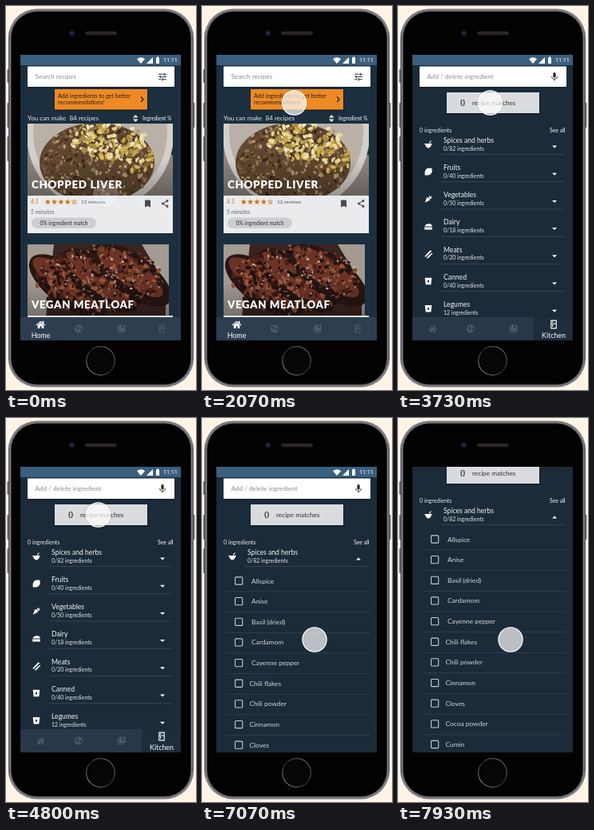
Write an HTML page that moves like this. It is 238 px wide and 480 px high and loops after 8 s.

```html
<!DOCTYPE html>
<html lang="en">
<head>
<meta charset="utf-8">
<title>Recipe app walkthrough</title>
<style>
  html, body { margin: 0; width: 100%; height: 100%; overflow: hidden; background: #fdf4e6; }
  svg { display: block; width: 100vw; height: 100vh; }
  text { font-family: Lato, "Open Sans", sans-serif; white-space: pre; }
</style>
</head>
<body>
<svg id="stage" viewBox="0 0 238 480">
  <defs>
    <clipPath id="screenClip"><rect x="18" y="61" width="201" height="357"/></clipPath>
    <clipPath id="photoA"><rect x="27" y="147" width="182" height="90"/></clipPath>
    <clipPath id="photoB"><rect x="27" y="298" width="177" height="90"/></clipPath>
    <linearGradient id="shade" x1="0" y1="0" x2="0" y2="1">
      <stop offset=".5" stop-color="#000" stop-opacity="0"/>
      <stop offset="1" stop-color="#000" stop-opacity=".28"/>
    </linearGradient>
    <linearGradient id="rim" x1="0" y1="0" x2="1" y2="0">
      <stop offset="0" stop-color="#4f4d54"/><stop offset=".01" stop-color="#7d7a82"/>
      <stop offset=".99" stop-color="#7d7a82"/><stop offset="1" stop-color="#4f4d54"/>
    </linearGradient>
    <linearGradient id="ring" x1="0" y1="1" x2="1" y2="0">
      <stop offset="0" stop-color="#8b898c"/><stop offset=".5" stop-color="#2b2a2c"/>
      <stop offset="1" stop-color="#6d6b6e"/>
    </linearGradient>
  </defs>
</svg>
<script>
const LOOP = 8000;
const ICON = {
  home: 'M12 4L1 13l1.300 1.600L12 6.700l9.700 7.900L23 13l-4-3.300V4h-3v3.300zM12 8.500L5 14v7h5v-5h4v5h5v-7z',
  globe: 'M12 2a10 10 0 1 0 0 20a10 10 0 0 0 0-20zM5 9l5-4 3 2-3 4 2 3-2 5-2-5zM15 10l4-1 1 4-3 5-3-4z',
  book: 'M2 6h2v14h14v2H2zM6 2h16v16H6zM13 4v8l2.500-2 2.500 2V4z',
  fridge: 'M5 2h14v20H5zM7 4v5h10V4zM7 11v9h10v-9zM8.500 5h2v3h-2zM8.500 12h2v5h-2z',
  tune: 'M3 17v2h6v-2zM3 5v2h10V5zM13 21v-2h8v-2h-8v-2h-2v6zM7 9v2H3v2h4v2h2V9zM21 13v-2H11v2zM15 9h2V7h4V5h-4V3h-2z',
  mic: 'M12 14a3 3 0 0 0 3-3V5a3 3 0 0 0-6 0v6a3 3 0 0 0 3 3zM17.300 11a5.300 5.300 0 0 1-10.600 0H5a7 7 0 0 0 6 6.700V21h2v-3.300a7 7 0 0 0 6-6.700z',
  bookmark: 'M7 3h10a2 2 0 0 1 2 2v16l-7-3-7 3V5a2 2 0 0 1 2-2z',
  share: 'M18 2a3 3 0 0 0-3 3.700L8.500 9.500a3 3 0 1 0 0 5L15 18.300a3 3 0 1 0 1-1.700L9 12.700v-1.400L16 7.400A3 3 0 1 0 18 2z',
  star: 'M12 17.300l6.200 3.700-1.600-7L22 9.200l-7.200-.6L12 2 9.200 8.600 2 9.200 7.500 14l-1.700 7z',
  mortar: 'M2 10h20v2h-2c0 4-2 6-4 7v2H8v-2c-2-1-4-3-4-7H2zM13 9l5-7 2 1-4 6z',
  lemon: 'M21 3c-6-2-13-1-16 4-3 4-2 9-2 14 5 0 10 1 14-2 5-4 6-10 4-16z',
  carrot: 'M3 21l5-13c4-2 9 2 8 7zM14 8l1-6 2 4 4-3-2 5 4 1-6 2z',
  cheese: 'M2 12C4 6 10 4 16 5c4 1 6 4 6 7zM2 14h20v6H2z',
  bacon: 'M2 17c6 0 4-5 8-7s3-6 9-7l2 3c-6 1-4 5-8 7s-3 6-9 7zM7 22c5-1 4-5 8-7s3-4 7-5l1 3c-5 1-4 4-7 6s-4 4-7 5z',
  can: 'M3 3h18l-2 18H5zM12 8c-3 3-3 7 0 8 3-1 3-5 0-8z'
};

function add(parent, tag, attrs, content) {
  const el = document.createElementNS('http://www.w3.org/2000/svg', tag);
  for (const key in attrs) el.setAttribute(key, attrs[key]);
  if (content) el.textContent = content;
  parent.appendChild(el);
  return el;
}
const group = (p, attrs = {}) => add(p, 'g', attrs);
const rect = (p, x, y, width, height, fill, extra) => add(p, 'rect', { x, y, width, height, fill, ...extra });
const circle = (p, cx, cy, r, fill, extra) => add(p, 'circle', { cx, cy, r, fill, ...extra });
const path = (p, d, fill, extra) => add(p, 'path', { d, fill, ...extra });
const oval = (p, cx, cy, rx, ry, fill, turn = 0) =>
  add(p, 'ellipse', { cx, cy, rx, ry, fill, transform: `rotate(${turn} ${cx} ${cy})` });
const label = (p, str, x, y, size, fill, extra) =>
  add(p, 'text', { x, y, 'font-size': size, fill, ...extra }, str);
const icon = (p, name, cx, cy, size, fill) => path(p, ICON[name], fill, {
  'fill-rule': 'evenodd',
  transform: `translate(${cx - size / 2} ${cy - size / 2}) scale(${size / 24})`
});

function seeded(seed) {
  return () => (seed = (seed * 16807) % 2147483647) / 2147483647;
}

// Scatter small rounded crumbs inside an ellipse.
function crumbs(p, n, cx, cy, rx, ry, size, colours, seed) {
  const rnd = seeded(seed);
  for (let i = 0; i < n; i++) {
    const a = rnd() * Math.PI * 2, d = Math.sqrt(rnd());
    const w = size * (.5 + rnd());
    oval(p, cx + Math.cos(a) * d * rx, cy + Math.sin(a) * d * ry, w, w * .6,
      colours[Math.floor(rnd() * colours.length)], rnd() * 180);
  }
}

function statusBar(p) {
  rect(p, 18, 61, 201, 13, '#3b5f7e');
  path(p, 'M164 66.200q5-4 10 0l-5 5.800z', '#fff');
  path(p, 'M176 72h8v-8z', '#fff');
  path(p, 'M188 64.500h1v-1h2v1h1V72h-4z', '#fff');
  label(p, '11:11', 197, 70.300, 7.200, '#fff', { style: 'font-family:Roboto,sans-serif' });
}

function searchBox(p, hint, name) {
  rect(p, 27, 76, 184, 26.500, '#000', { opacity: .25 });
  rect(p, 27, 75.500, 184, 25.500, '#fff', { rx: 1 });
  label(p, hint, 36.500, 91, 8.200, '#8a8d91');
  icon(p, name, 196, 88.500, 13, '#26282b');
}

function navBar(p, active, bg, dim) {
  rect(p, 18, 389, 201, 29, bg);
  ['home', 'globe', 'book', 'fridge'].forEach((name, i) => {
    const on = i === active, x = [43.500, 91, 144.500, 195][i];
    if (on && i) rect(p, 170, 389, 49, 29, '#1d2d3b');
    icon(p, name, x, on ? 398 : 403.500, on ? 13 : 12, on ? '#fff' : dim);
    if (on) label(p, i ? 'Kitchen' : 'Home', x, 414.800, 8.900, '#fff', { 'text-anchor': 'middle' });
  });
}

function liverPhoto(p) {
  const g = group(p, { 'clip-path': 'url(#photoA)' });
  rect(g, 27, 147, 182, 90, '#8d857e');
  path(g, 'M150 147h59v40z', '#3d2b20');
  oval(g, 118, 160, 92, 95, '#d3cfca');
  oval(g, 118, 158, 84, 88, '#b9b1a8');
  oval(g, 114, 196, 72, 50, '#5e4630');
  crumbs(g, 480, 114, 196, 71, 49, 2.200, ['#7b5d3f', '#48331f', '#94764f', '#b59a70', '#35251a', '#6b4d32'], 71);
  crumbs(g, 150, 127, 168, 48, 25, 3.200, ['#d9bd5c', '#e6d596', '#c6a548', '#efe3b8', '#a98a45'], 29);
  crumbs(g, 60, 160, 190, 28, 18, 2.800, ['#d9bd5c', '#e6d596', '#c6a548', '#8a6a3c'], 43);
  rect(g, 27, 147, 182, 90, 'url(#shade)');
}

function loafPhoto(p) {
  const g = group(p, { 'clip-path': 'url(#photoB)' });
  rect(g, 27, 298, 177, 90, '#a39b92');
  path(g, 'M60 298h110l30 50v40H50z', '#3a2420');
  for (let i = 0; i < 3; i++) {
    const x = 78 + i * 40, y = 350 - i * 7;
    oval(g, x, y, 58, 25, '#271614', 36);
    oval(g, x - 3, y - 4, 50, 16, '#6a3325', 36);
  }
  crumbs(g, 420, 117, 344, 80, 46, 2.700, ['#24130f', '#7c3a28', '#4a2019', '#94553a', '#351a16', '#1c1112'], 53);
  crumbs(g, 110, 122, 338, 76, 36, 1.400, ['#b98a73', '#c9b3a8', '#a0603f', '#8d7a74'], 97);
  rect(g, 27, 298, 177, 90, 'url(#shade)');
}

function homeScreen(p) {
  const g = group(p), title = { 'font-weight': 900, 'letter-spacing': '.05em' };
  rect(g, 18, 61, 201, 357, '#1b2f3f');
  statusBar(g);
  searchBox(g, 'Search recipes', 'tune');
  rect(g, 61, 105, 117, 26, '#000', { opacity: .35 });
  rect(g, 61, 104, 116, 25.500, '#ee8a25');
  label(g, 'Add ingredients to get better', 65, 114.800, 7.200, '#2b2116');
  label(g, 'recommendations!', 65, 123, 7.200, '#2b2116');
  path(g, 'M169 113.500l3 3.300-3 3.300', 'none', { stroke: '#2b2116', 'stroke-width': 1.300 });
  label(g, 'You can make  84 recipes', 27, 143, 8.050, '#e6eaee');
  path(g, 'M159 139.500l3.200-3.500 3.200 3.500zM159 141.500l3.200 3.500 3.200-3.500z', '#fff');
  label(g, 'Ingredient %', 171, 142.800, 6.600, '#fff');

  liverPhoto(g);
  label(g, 'CHOPPED LIVER', 32, 227.800, 13.400, '#fff', title);
  rect(g, 27, 237, 182, 47, '#e9ebec');
  label(g, '4.1', 31, 247.300, 7, '#d0741c');
  for (let i = 0; i < 5; i++) icon(g, 'star', 52.300 + i * 8.300, 244.800, 8.600, '#d5741a');
  icon(g, 'star', 85.500, 244.800, 4.800, '#e9ebec');
  label(g, '12 reviews', 94, 247.300, 6.400, '#54575b');
  icon(g, 'bookmark', 177.500, 247, 12, '#494c50');
  icon(g, 'share', 199, 247, 12, '#494c50');
  label(g, '5 minutes', 31, 260, 6.800, '#64676b');
  rect(g, 32, 264.500, 81, 13.500, '#cdced1', { rx: 6.750 });
  label(g, '0% ingredient match', 42.500, 273.500, 6.650, '#2c2e31');

  loafPhoto(g);
  label(g, 'VEGAN MEATLOAF', 32, 378, 13.200, '#fff', title);
  rect(g, 27, 387, 182, 2, '#e9ebec');
  navBar(g, 0, '#2c3e4f', '#4b5d6e');
}

function category(p, name, count, sign, y, open) {
  icon(p, sign, 38, y + 5, 11.500, '#fff');
  label(p, name, 57, y + 2.800, 8.600, '#f4f6f8');
  label(p, count, 57, y + 12.500, 6.950, '#e3e7ea');
  path(p, open ? `M193 ${y + 9.500}h6l-3-3z` : `M193 ${y + 6.500}h6l-3 3z`, '#fff');
  rect(p, 54, y + 17.300, 154, .6, '#52616e', { opacity: .75 });
}

function kitchenBase(p) {
  const g = group(p);
  rect(g, 18, 61, 201, 480, '#1b2b39');
  statusBar(g);
  searchBox(g, 'Add / delete ingredient', 'mic');
  rect(g, 61, 109, 117, 26.500, '#000', { opacity: .35 });
  rect(g, 61, 108, 116, 26, '#dadbde');
  label(g, '0', 78, 124.700, 11, '#222', { style: 'font-family:"Noto Serif",serif' });
  label(g, 'recipe matches', 93, 124, 8.250, '#2d3034');
  label(g, '0 ingredients', 27, 157.500, 7.100, '#e8ecef');
  label(g, 'See all', 190, 157.500, 6.900, '#fff');
  return g;
}

const SPICES = ['Spices and herbs', '0/82 ingredients', 'mortar'];

function kitchenScreen(p) {
  const g = kitchenBase(p);
  [SPICES,
    ['Fruits', '0/40 ingredients', 'lemon'],
    ['Vegetables', '0/50 ingredients', 'carrot'],
    ['Dairy', '0/18 ingredients', 'cheese'],
    ['Meats', '0/20 ingredients', 'bacon'],
    ['Canned', '0/40 ingredients', 'can'],
    ['Legumes', '12 ingredients', 'can']
  ].forEach((row, i) => category(g, ...row, 168 + i * 34.200));
  navBar(g, 3, '#293848', '#4c5a68');
  return g;
}

function spiceScreen(p) {
  const g = kitchenBase(p);
  category(g, ...SPICES, 168, true);
  ['Allspice', 'Anise', 'Basil (dried)', 'Cardamom', 'Cayenne pepper', 'Chili flakes',
    'Chili powder', 'Cinnamon', 'Cloves', 'Cocoa powder', 'Cumin'].forEach((name, i) => {
    const y = 203.700 + i * 25.650;
    rect(g, 41.500, y - 4.800, 9.200, 9.200, 'none', { rx: 1, stroke: '#c3cad0', 'stroke-width': 1.100 });
    label(g, name, i < 5 ? 62 : 59.500, y + 2.800, 8.400, '#d3d9de');
    rect(g, 30, y + 13, 181, .6, '#43525f', { opacity: .8 });
  });
  return g;
}

function phone(p) {
  [[79, 17], [121, 31], [163, 31]].forEach(([y, h]) => rect(p, 1.600, y, 3, h, '#5a5860', { rx: 1 }));
  rect(p, 233.500, 121, 2.800, 31, '#5a5860', { rx: 1 });
  rect(p, 3, 3.500, 232, 473, 'url(#rim)', { rx: 36 });
  rect(p, 6, 6.500, 226, 467, '#2d2c30', { rx: 33 });
  rect(p, 7, 7.500, 224, 465, '#020203', { rx: 32 });
  circle(p, 82.500, 34, 3.800, '#15161f');
  circle(p, 82.500, 34, 1.800, '#27304e');
  rect(p, 99, 31.800, 40, 4.400, '#2a2527', { rx: 2.200 });
  circle(p, 118.500, 443.500, 17.800, '#060607', { stroke: 'url(#ring)', 'stroke-width': 1.200 });
}

const stage = document.getElementById('stage');
phone(stage);
const view = group(stage, { 'clip-path': 'url(#screenClip)' });
homeScreen(view);
const kitchen = kitchenScreen(view);
const spices = spiceScreen(view);
const cursor = group(stage);
circle(cursor, 0, 0, 16, 'none', { stroke: '#000', 'stroke-opacity': .2 });
circle(cursor, 0, 0, 15.200, '#fff', { 'fill-opacity': .7, stroke: '#fff', 'stroke-width': 1.100 });

// time, x, y
const ROUTE = [
  [0, 125, 236], [930, 114, 167], [1600, 115.500, 121], [5680, 115.500, 121],
  [5930, 180, 149], [6250, 195, 175], [6580, 195, 175], [7050, 141, 277], [LOOP, 141, 277]
];
const ramp = (t, from, to) => Math.min(1, Math.max(0, (t - from) / (to - from)));
const smooth = k => k * k * (3 - 2 * k);

function cursorAt(t) {
  const i = ROUTE.findIndex(stop => stop[0] > t);
  const [t0, x0, y0] = ROUTE[i - 1], [t1, x1, y1] = ROUTE[i];
  const k = ramp(t, t0, t1);
  return [x0 + (x1 - x0) * k, y0 + (y1 - y0) * k];
}

function draw(t) {
  kitchen.setAttribute('opacity', smooth(ramp(t, 2630, 3050)));
  spices.setAttribute('opacity', smooth(ramp(t, 6570, 6900)));
  spices.setAttribute('transform', `translate(0 ${-52 * smooth(ramp(t, 7340, 7930))})`);
  const [x, y] = cursorAt(t);
  cursor.setAttribute('transform', `translate(${x} ${y})`);
  cursor.setAttribute('opacity', .3 + .7 * ramp(t, 0, 400));
}

function tick() {
  draw(performance.now() % LOOP);
  requestAnimationFrame(tick);
}
tick();
</script>
</body>
</html>
```
